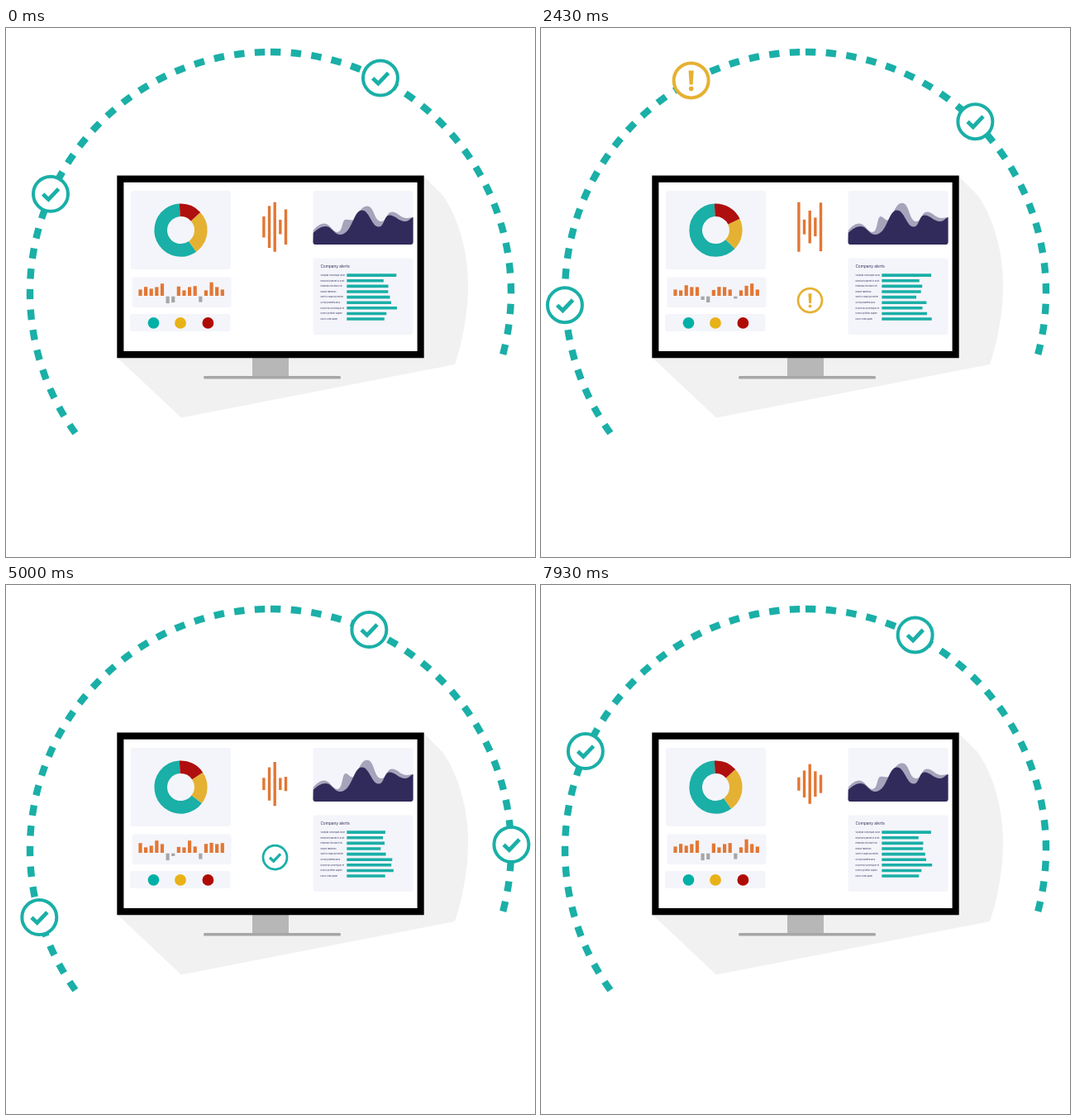
An HTML page with a canvas for the animation above (8000 ms loop, 640 px wide and 640 px high).

```html
<!DOCTYPE html>
<html lang="en">
<head>
<meta charset="utf-8">
<title>Monitoring dashboard</title>
<style>
html, body { margin: 0; width: 100%; height: 100%; overflow: hidden; background: #fff; }
canvas { display: block; width: 640px; height: 640px; }
</style>
</head>
<body>
<canvas id="stage"></canvas>
<script>
const LOOP = 8000, STEP = LOOP / 112, TURN = 7930;
const TEAL = '#1aafa7', YELLOW = '#e5b132', RED = '#af0f0f', ORANGE = '#e27735';
const NAVY = '#302b5b', CARD = '#f4f5fa', GREY = '#a6a6a6';
const RAD = Math.PI / 180, TAU = Math.PI * 2;

const canvas = document.getElementById('stage');
const ctx = canvas.getContext('2d');
const dpr = window.devicePixelRatio || 1;
canvas.width = canvas.height = 640 * dpr;

// Label, mean bar length, swing, moment of the longest bar (share of the loop)
const ALERTS = [
  ['Volutpat consequat dolor', 55, 8.5, .15],
  ['Nesciunt placeat in a elit', 44.5, 1, .25],
  ['Phasellus tincidunt vel', 48.2, 2.5, .1],
  ['Neque maximus', 46, 5, .1],
  ['Sunt in culpa qui minim', 47.5, 6.5, .88],
  ['Ut nisi pharetra arcu', 54.3, .7, .6],
  ['Dolore ea scelerisque et', 55, 7, .9],
  ['Donec porttitor sapien', 53, 5, .5],
  ['Fusce urna quam', 50, 10.5, .32]
];

// Mean column heights
const COLUMNS = [9, 8, 10, 12, 12, -7, -6, 8.5, 8, 12, 9, -5.5, 8, 13.5, 12, 9];

// Entry times of the badges; the second one carries a warning at first
const BADGES = [{ birth: 241, warn: true }, { birth: 1660 }, { birth: 4525 }, { birth: 6566 }];

const clamp = (v, a = 0, b = 1) => Math.min(b, Math.max(a, v));
const ramp = (t, a, b) => clamp((t - a) / (b - a));
const pulse = (t, a, b, c, d) => ramp(t, a, b) - ramp(t, c, d);
const ease = u => u * u * (3 - 2 * u);

function box(x0, y0, x1, y1, color, r = 0) {
  ctx.fillStyle = color;
  ctx.beginPath();
  ctx.roundRect(x0, y0, x1 - x0, y1 - y0, r);
  ctx.fill();
}

function disc(x, y, r, color) {
  ctx.fillStyle = color;
  ctx.beginPath();
  ctx.arc(x, y, r, 0, TAU);
  ctx.fill();
}

function arc(x, y, r, from, to, width, color) {
  ctx.strokeStyle = color;
  ctx.lineWidth = width;
  ctx.beginPath();
  ctx.arc(x, y, r, from * RAD, to * RAD);
  ctx.stroke();
}

function badge(x, y, scale, warn, alpha = 1) {
  if (scale <= 0 || alpha <= 0) return;
  ctx.save();
  ctx.globalAlpha = alpha;
  ctx.translate(x, y);
  ctx.scale(scale, scale);
  const color = warn ? YELLOW : TEAL;
  disc(0, 0, 21, '#fff');
  arc(0, 0, 21, 0, 360, 4, color);
  if (warn) {
    ctx.fillStyle = color;
    ctx.fill(new Path2D('M-3.1 -12H3.1L2 5H-2Z'));
    disc(0, 10, 2.8, color);
  } else {
    ctx.lineWidth = 4.8;
    ctx.stroke(new Path2D('M-9.3 .2L-2.6 6.6L9.6 -6.2'));
  }
  ctx.restore();
}

function ring() {
  const dash = a => arc(320, 320, 291, a - 91.22, a - 88.78, 8.4, TEAL);
  for (let k = 0; k < 22; k++) dash(1.21 + 4.88 * k);
  for (let k = 0; k < 26; k++) dash(-2.56 - 4.88 * k);
}

function monitor() {
  ctx.fillStyle = '#f1f1f1';
  ctx.fill(new Path2D('M505 179L529 203C548 232 559 270 559 312C559 345 552 380 543 407L212 471.5L135 399Z'));
  box(298, 399, 342, 422, '#b7b7b7');
  box(239, 421, 405, 424.6, GREY, 1.5);
  box(134.3, 178.6, 505.7, 399.3, '#000');
  box(142.4, 186.8, 497.6, 391, '#fff');
  box(151, 197, 272, 292, CARD, 3);
  box(152.5, 301.5, 272.5, 338, CARD, 3);
  box(150, 346, 271.5, 367, CARD, 3);
  box(371.5, 197, 492.5, 262, CARD, 3);
  box(371.5, 278.5, 492.5, 371, CARD, 3);
}

function donut(t) {
  const redEnd = -42.5 + 17 * pulse(t, 0, 1500, 4290, 5710);
  const yellowEnd = 54.4 - 17 * pulse(t, 1290, 3160, 5710, 6930);
  const slice = (from, to, color) => arc(211.5, 244.6, 24.3, from, to, 15.6, color);
  slice(yellowEnd, 267, TEAL);
  slice(redEnd, yellowEnd, YELLOW);
  slice(-93, redEnd, RED);
}

// Three poses per cycle, each held and then eased into the next
function columns(t) {
  const q = (t - 750) / (LOOP / 6) + .5, n = Math.floor(q);
  const pose = n + ease(ramp(q - n, .3, .7));
  COLUMNS.forEach((mean, k) => {
    const h = mean + 2.8 * Math.cos(TAU * (pose + k - 1) / 3);
    const x = 160.4 + 6.62 * k;
    if (h > 0) box(x, 324 - h, x + 4.2, 324, ORANGE);
    else box(x, 324.7, x + 4.2, 324.7 - h, GREY);
  });
}

function signal(t) {
  [-30, 37, 90, 238, 14].forEach((phase, k) => {
    const turns = 11 + (k * 7) % 5 * 2;
    const h = 18.5 + 11.5 * Math.sin(phase * RAD + TAU * turns * t / LOOP);
    const x = 310.2 + 6.65 * k;
    box(x, 240.7 - h, x + 3.4, 240.7 + h, ORANGE);
  });
}

function waves(t) {
  const lift = pulse(t, 0, 1290, 5710, 6930);
  const peak = 215.5 - 3.7 * lift, step = 231.8 - 3.8 * lift;
  ctx.save();
  ctx.beginPath();
  ctx.roundRect(371.5, 197, 121, 65, 3);
  ctx.clip();
  ctx.fillStyle = '#a5a4bb';
  ctx.fill(new Path2D(`M371.5 245C376 240 380 236.5 385 236.5C392 236.5 395 247 401 247C408 246 406 ${step} 411 ${step}
    C414 ${step} 416 232.5 419 232.5C426 232 427 ${peak} 437 ${peak}C446 ${peak} 445 234 454 234C461 234 460 222.5 467 222.5
    C474 222.5 477 230 485 230C488 230 490 229 493 229V262H371Z`));
  ctx.fillStyle = NAVY;
  ctx.fill(new Path2D(`M371.5 248C377 243 381 240 387 240C394 240 397 250 404 250C419 250 420 220.5 430.5 220.5
    C440 220.5 442 240.5 451 240.5C458 240.5 457 226.5 464 226.5C471 226.5 475 234 483 234C488 234 489 229.5 493 229V262H371Z`));
  ctx.restore();
}

function alerts(t) {
  const face = 'px Inter, Roboto, sans-serif';
  ctx.fillStyle = NAVY;
  ctx.font = 4.75 + face;
  ctx.fillText('Company alerts', 380.4, 289.8);
  ctx.font = 2.5 + face;
  ALERTS.forEach(([label], k) => ctx.fillText(label, 380.4, 300 + 6.62 * k));
  ALERTS.forEach(([, mean, swing, top], k) => {
    const y = 297.3 + 6.62 * k;
    const length = mean + swing * Math.cos(TAU * (t / LOOP - top));
    box(412.3, y, 412.3 + length, y + 3.6, TEAL);
  });
}

function screenBadge(t) {
  const x = 325.5, y = 329.6, size = .69;
  badge(x, y, size, true, pulse(t, 950, 1350, 4150, 4250));
  badge(x, y, size, false, pulse(t, 3930, 4250, 6600, 6960));
}

function travel({ birth, warn }, t) {
  const age = (t - birth + TURN) % TURN;
  const angle = -218 + 361.3 * age / TURN;
  const size = ramp(age, 0, 300) * (1 - ramp(angle, 4, 15));
  const x = 320 + 291.5 * Math.cos(angle * RAD), y = 320 + 291.5 * Math.sin(angle * RAD);
  if (warn) badge(x, y, size, true, 1 - ramp(t, 4230, 4330));
  badge(x, y, size, false, warn ? ramp(t, 3930, 4280) : 1);
}

function draw(t) {
  ctx.setTransform(dpr, 0, 0, dpr, 0, 0);
  ctx.fillStyle = '#fff';
  ctx.fillRect(0, 0, 640, 640);
  monitor();
  donut(t);
  columns(t);
  disc(178.5, 356.8, 6.9, '#00b0a6');
  disc(211, 356.9, 6.9, '#e8b217');
  disc(244.4, 356.9, 6.9, '#b00a05');
  signal(t);
  waves(t);
  alerts(t);
  screenBadge(t);
  ring();
  BADGES.forEach(b => travel(b, t));
}

const begin = performance.now();
function tick() {
  const t = (performance.now() - begin) % LOOP;
  draw(Math.floor(t / STEP + .1) % 112 * STEP);
  requestAnimationFrame(tick);
}
tick();
</script>
</body>
</html>
```
